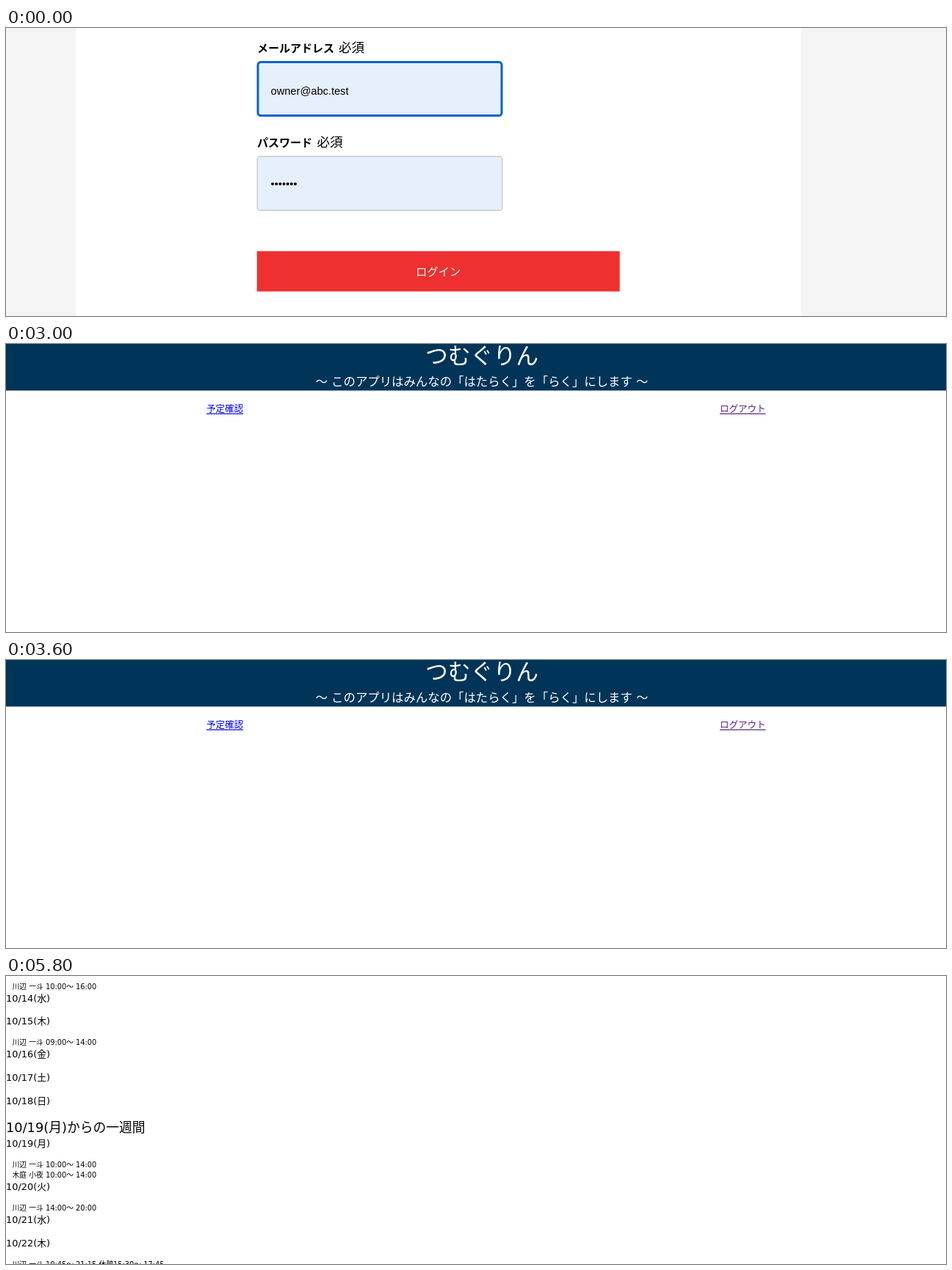
An HTML page with a canvas that plays this animation: 1280x393 px, repeating every 7 s.

```html
<!DOCTYPE html>
<html lang="ja">
<head>
<meta charset="utf-8">
<title>シフト管理</title>
<style>
  html, body { margin: 0; width: 100%; height: 100%; overflow: hidden; background: #fff; }
  canvas { display: block; width: 1280px; height: 393px; }
</style>
</head>
<body>
<canvas id="stage" width="1280" height="393"></canvas>
<script>
const ctx = document.getElementById('stage').getContext('2d');
const W = 1280, H = 393, LOOP = 7000;
const JP = '"Noto Sans CJK JP", "Noto Sans CJK", sans-serif';
const MIXED = '"DejaVu Sans", ' + JP;

function rect(x, y, w, h, color) {
  ctx.fillStyle = color;
  ctx.fillRect(x, y, w, h);
}

// Text is placed by the middle of its em box.
function text(str, x, cy, size, { color = '#000', weight = 400, align = 'left', font = JP } = {}) {
  ctx.font = `${weight} ${size}px ${font}`;
  ctx.textAlign = align;
  ctx.fillStyle = color;
  ctx.fillText(str, x, cy + size * 0.38);
}

function field(x, y, w, h, line, color) {
  ctx.beginPath();
  ctx.roundRect(x + line / 2, y + line / 2, w - line, h - line, 4);
  ctx.fillStyle = '#e6f0fd';
  ctx.fill();
  ctx.lineWidth = line;
  ctx.strokeStyle = color;
  ctx.stroke();
}

function label(name, cy, requiredX) {
  text(name, 342, cy, 15, { weight: 700 });
  text('必須', requiredX, cy - 0.5, 17.5);
}

function link(str, x, color) {
  text(str, x, 88.4, 12.5, { color, weight: 500 });
  rect(x, 94.6, ctx.measureText(str).width, 1.2, color);
}

function login() {
  rect(0, 0, 95, H, '#f5f5f5');
  rect(1082, 0, W - 1082, H, '#f5f5f5');

  label('メールアドレス', 27, 453);
  field(341.5, 45, 335, 76, 3, '#0362cd');
  text('owner@abc.test', 360.5, 85.4, 14.65, { font: '"Liberation Sans", Arial, sans-serif' });

  label('パスワード', 156, 423.5);
  field(341.5, 174.5, 335, 75, 1.4, '#c5c9cd');
  ctx.fillStyle = '#000';
  for (let i = 0; i < 7; i++) {
    ctx.beginPath();
    ctx.arc(363 + i * 5.15, 212.7, 2, 0, Math.PI * 2);
    ctx.fill();
  }

  rect(341.7, 304.5, 494, 55, '#ee3030');
  text('ログイン', 588.5, 331.7, 15.3, { color: '#fff', align: 'center' });
}

function home() {
  rect(0, 0, W, 63.5, '#003458');
  const white = { color: '#fff', align: 'center' };
  text('つむぐりん', 648, 15.5, 30.8, white);
  text('〜 このアプリはみんなの「はたらく」を「らく」にします 〜', 648, 51.1, 16.4,
    { ...white, weight: 500, font: MIXED });
  link('予定確認', 273, '#0000ee');
  link('ログアウト', 972, '#551a8b');
}

const DAYS = [
  ['10/14(水)', 30], ['10/15(木)', 61.5], ['10/16(金)', 106.5], ['10/17(土)', 138.5],
  ['10/18(日)', 170], ['10/19(月)', 228], ['10/20(火)', 287.5], ['10/21(水)', 332.5],
  ['10/22(木)', 364]
];
const A = '川辺 一斗', B = '木庭 小夜';
const SHIFTS = [
  [A, '10:00〜 16:00', 14], [A, '09:00〜 14:00', 90.3],
  [A, '10:00〜 14:00', 257.7], [B, '10:00〜 14:00', 271.6],
  [A, '14:00〜 20:00', 316.6], [A, '10:45〜 21:15 休憩15:30〜 17:45', 393]
];

function schedule() {
  const style = { font: MIXED, weight: 500 };
  for (const [day, y] of DAYS) text(day, 0, y, 12.9, style);
  for (const [name, hours, y] of SHIFTS) text(`${name} ${hours}`, 8.5, y, 9.8, style);
  text('10/19(月)からの一週間', 0, 206, 17.8, { font: MIXED });
}

const start = performance.now();

function draw(now) {
  const t = Math.max(0, now - start) % LOOP;
  rect(0, 0, W, H, '#fff');
  if (t < 3000) login();
  else if (t < 4000) home();
  else schedule();
  requestAnimationFrame(draw);
}
draw(start);
</script>
</body>
</html>
```
